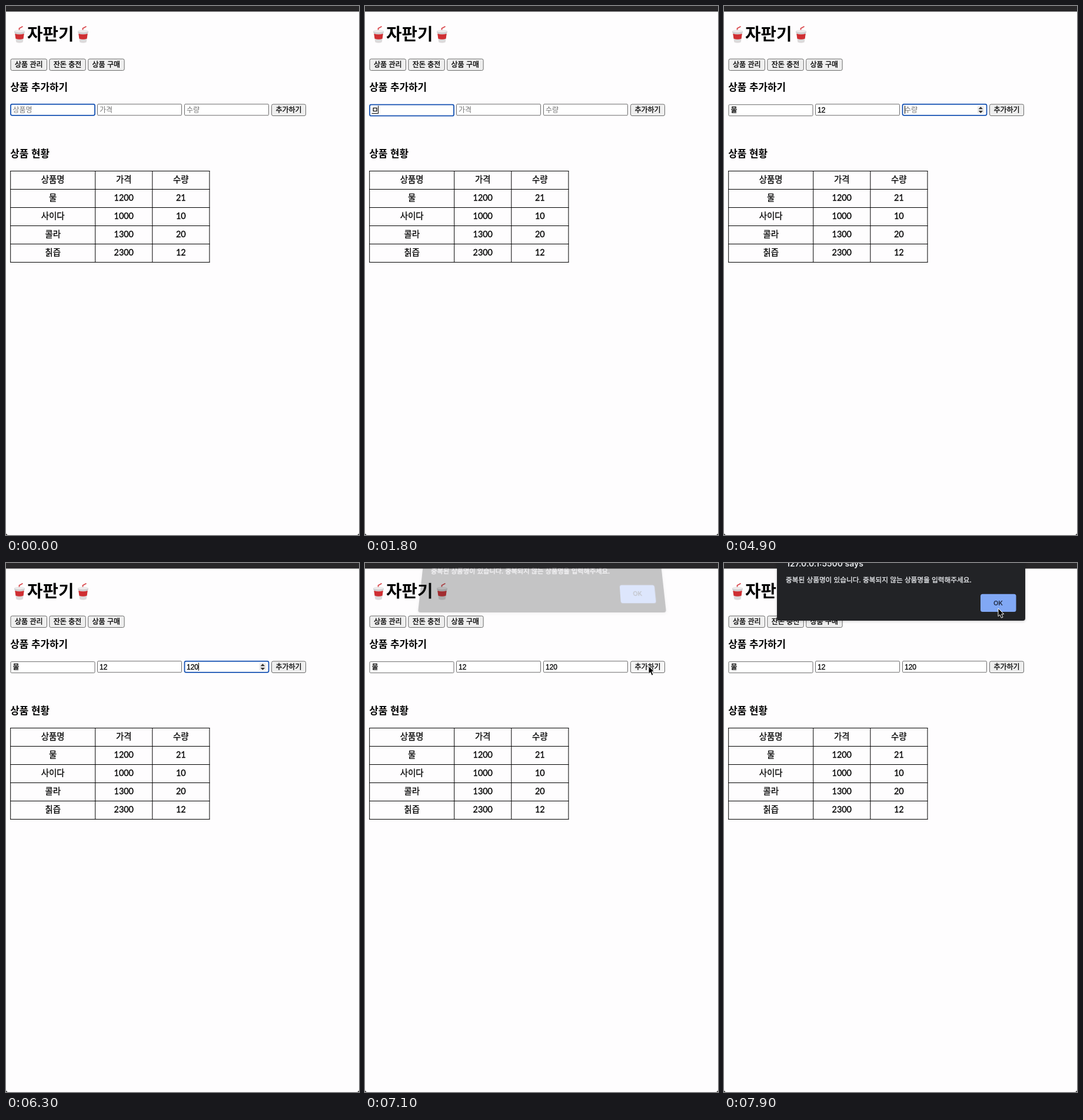
An HTML page for the animation above (8 s loop, 600 by 899 pixels).

```html
<!DOCTYPE html>
<html lang="ko">
<head>
<meta charset="utf-8">
<title>자판기</title>
<style>
  html, body { margin: 0; width: 100%; height: 100%; overflow: hidden; background: #000; }
  svg { position: absolute; left: 0; top: 0; display: block; }
  /* A hairline stroke gives the regular face a medium weight */
  text {
    font-family: "Noto Sans CJK KR", "Noto Sans CJK", sans-serif;
    fill: #000; stroke: #000; stroke-width: .3px; white-space: pre;
  }
  .h1 { font-size: 28.8px; font-weight: 700; stroke: none; }
  .h3 { font-size: 16.85px; font-weight: 700; stroke: none; }
  .button { fill: #efefef; stroke: #6a6a6a; }
  .label { font-size: 12px; text-anchor: middle; }
  .cell { font-family: Lato, "Noto Sans CJK KR", "Noto Sans CJK", sans-serif; font-size: 14.4px; text-anchor: middle; }
  .value { font-family: "Liberation Sans", "Noto Sans CJK KR", "Noto Sans CJK", sans-serif; font-size: 12px; }
  .value.hint { fill: #757575; stroke: none; }
  #dialog { transform-origin: 301px 98px; overflow: visible; filter: drop-shadow(0 1px 2px rgba(0, 0, 0, .22)); }
  #dialog text { fill: #e8eaed; stroke: #e8eaed; }
  #dialog .host { font: 600 14px Inter, sans-serif; stroke: none; }
  #dialog .message { font-size: 11.66px; }
  #dialog .ok { font: 600 11px Inter, sans-serif; fill: #202a40; stroke: none; text-anchor: middle; }
</style>
</head>
<body>
<svg id="page" width="600" height="899" viewBox="0 0 600 899">
  <defs>
    <g id="cup">
      <path d="M10 10V5L16 1.8" fill="none" stroke="#d8454a" stroke-width="1.8" stroke-linejoin="round"/>
      <path d="M2.4 11L4.8 28.5Q10.5 31 16.2 28.5L18.6 11Z" fill="#dcdadb"/>
      <path d="M2.8 14Q10.5 16.6 18.2 14L17.1 22.6Q10.5 25 3.9 22.6Z" fill="#cf2f33"/>
      <path d="M1.8 9.6V12.4Q10.5 16 19.2 12.4V9.6Z" fill="#c9c7c9"/>
      <ellipse cx="10.5" cy="9.8" rx="8.7" ry="2.4" fill="#eceaeb"/>
    </g>
  </defs>
  <path d="M0 0H600V895Q600 899 596 899H4Q0 899 0 895Z" fill="#fefdfe"/>
  <rect width="600" height="9.5" fill="#282729"/>
  <use href="#cup" x="12.5" y="33"/>
  <use href="#cup" x="120.5" y="33"/>
  <text class="h1" x="36" y="58.3">자판기</text>
  <text class="h3" x="7.3" y="144">상품 추가하기</text>
  <text class="h3" x="7.3" y="257">상품 현황</text>
  <g id="controls"></g>
  <g id="table"></g>
</svg>

<svg id="dialog" width="600" height="110" viewBox="0 0 600 110">
  <rect x="90" y="-20" width="422" height="118" rx="4" fill="#222326"/>
  <text class="host" x="106" y="5.5">127.0.0.1:5500 says</text>
  <text class="message" x="105" y="32.7">중복된 상품명이 있습니다. 중복되지 않는 상품명을 입력해주세요.</text>
  <rect x="436" y="52.7" width="60.5" height="30.2" rx="3.5" fill="#81a8f5"/>
  <text class="ok" x="466" y="71.5">OK</text>
</svg>

<svg width="600" height="899" viewBox="0 0 600 899">
  <path id="pointer" d="M0 0V13.6L3 10.8L5.4 16.2L8 15.1L5.7 9.8H9.8Z" fill="#000" stroke="#fff" stroke-linejoin="round"/>
</svg>

<script>
const LOOP = 8000, STEP = 100;
const $ = id => document.getElementById(id);

// Each field: left edge, placeholder, focus span, typed values by time
const fields = [
  { x: 8, hint: '상품명', focus: [0, 2700], typed: [[1800, 'ㅁ'], [1900, '물']] },
  { x: 155.5, hint: '가격', focus: [2700, 3900], typed: [[3100, '12']], numeric: true },
  { x: 303.5, hint: '수량', focus: [3900, 7000], typed: [[5100, '1'], [5200, '12'], [5300, '120']], numeric: true }
];
const caretOn = [[300, 800], [1300, 2400], [2700, 3700], [3900, 4400], [4900, 5800], [6300, 6800]];
const composing = [1800, 2400];
const pressed = [7000, 7300];

// Pointer trips: [time, x, y]; hidden between trips
const trips = [
  { until: 1800, path: [[100, 3, 34], [300, 90, 120], [500, 300, 300], [700, 540, 364], [900, 580, 347]] },
  { until: LOOP, path: [[6500, 582, 231], [6700, 525, 197], [6900, 482, 175], [7300, 482, 175], [7400, 430, 138],
    [7500, 320, 62], [7600, 257, 31], [7700, 330, 42], [7800, 430, 68], [7900, 466, 77]] }
];

const within = (t, [from, to]) => t >= from && t < to;
const show = (el, on) => el.setAttribute('visibility', on ? 'visible' : 'hidden');

const button = (x, y, w, label, id = '') =>
  `<rect class="button" id="${id}" x="${x}" y="${y}" width="${w}" height="19.5" rx="2.5"/>
   <text class="label" x="${x + w / 2}" y="${y + 13.6}">${label}</text>`;

const fieldMarkup = ({ x, numeric }, i) =>
  `<rect id="box${i}" x="${x}" width="143" height="19" fill="#fff"/>
   <text id="value${i}" x="${x + 3.5}" y="180.6"></text>` +
  (numeric ? `<g id="spin${i}"><rect x="${x + 127}" y="170" width="12" height="13" rx="2" fill="#ececec"/>
   <path d="M${x + 129} 175.2l3.8 -4 3.8 4zm0 2.8h7.6l-3.8 4z" fill="#333"/></g>` : '');

$('controls').innerHTML =
  ['상품 관리', '잔돈 충전', '상품 구매'].map((label, i) => button(8 + i * 65.8, 90, 61.5, label)).join('') +
  fields.map(fieldMarkup).join('') +
  button(451.5, 167, 58, '추가하기', 'add') +
  '<path id="underline" d="M11.5 182.5H22.5" stroke="#000"/><path id="caret" d="M0 169.5V183" stroke="#000"/>';

const edges = [7.7, 151.7, 248.8, 345.9];
const rows = ['상품명 가격 수량', '물 1200 21', '사이다 1000 10', '콜라 1300 20', '칡즙 2300 12'];
const grid = edges.map(x => `M${x} 280V436`).join('') +
  [...rows, ''].map((_, i) => `M7.2 ${280.5 + 31 * i}H346.4`).join('');
$('table').innerHTML = `<path d="${grid}" stroke="#000" fill="none"/>` +
  rows.map((row, r) => row.split(' ').map((word, c) =>
    `<text class="cell" x="${(edges[c] + edges[c + 1]) / 2}" y="${300 + 31 * r}">${word}</text>`).join('')).join('');

function drawFields(t) {
  const blink = caretOn.some(span => within(t, span));
  fields.forEach((field, i) => {
    const focused = within(t, field.focus);
    const typed = field.typed.filter(([at]) => t >= at).pop();
    const box = $('box' + i), value = $('value' + i);
    box.setAttribute('y', i === 0 && typed ? 167.7 : 166.8);
    box.setAttribute('stroke', focused ? '#1551b2' : '#6a6a6a');
    box.setAttribute('stroke-width', focused ? 1.8 : 1);
    box.setAttribute('rx', focused ? 2.5 : 1.5);
    value.textContent = typed ? typed[1] : field.hint;
    value.setAttribute('class', typed ? 'value' : 'value hint');
    if (field.numeric) show($('spin' + i), focused);
    if (focused) {
      const offset = typed ? value.getComputedTextLength() : 0;
      $('caret').setAttribute('transform', `translate(${Math.floor(field.x + 3.5 + offset) + .5} 0)`);
    }
  });
  show($('caret'), blink);
  show($('underline'), within(t, composing));
  $('add').style.fill = within(t, pressed) ? '#f6f6f6' : '#efefef';
}

function drawPointer(t) {
  const trip = trips.find(({ until, path }) => within(t, [path[0][0], until]));
  show($('pointer'), trip);
  if (!trip) return;
  const { path } = trip;
  const next = path.findIndex(([at]) => at > t);
  const [t1, x1, y1] = next < 0 ? path[path.length - 1] : path[next];
  const [t0, x0, y0] = next < 0 ? [t1 - 1, x1, y1] : path[next - 1];
  const k = Math.min(1, (t - t0) / (t1 - t0));
  $('pointer').setAttribute('transform', `translate(${x0 + (x1 - x0) * k} ${y0 + (y1 - y0) * k})`);
}

function drawDialog(t) {
  const { style } = $('dialog');
  const tilting = t < 7200, settling = t < 7300;
  style.visibility = t < 7100 ? 'hidden' : 'visible';
  style.opacity = tilting ? .265 : settling ? .97 : 1;
  style.transform = tilting
    ? 'translateY(-14px) matrix3d(1,0,0,0, 0,1.053,0,-.00055, 0,0,1,0, 0,0,0,1)'
    : settling ? 'translateY(-.7px)' : 'none';
}

function frame(now) {
  const t = Math.floor(now % LOOP / STEP) * STEP;
  drawFields(t);
  drawPointer(t);
  drawDialog(t);
  requestAnimationFrame(frame);
}
frame(0);
</script>
</body>
</html>
```
